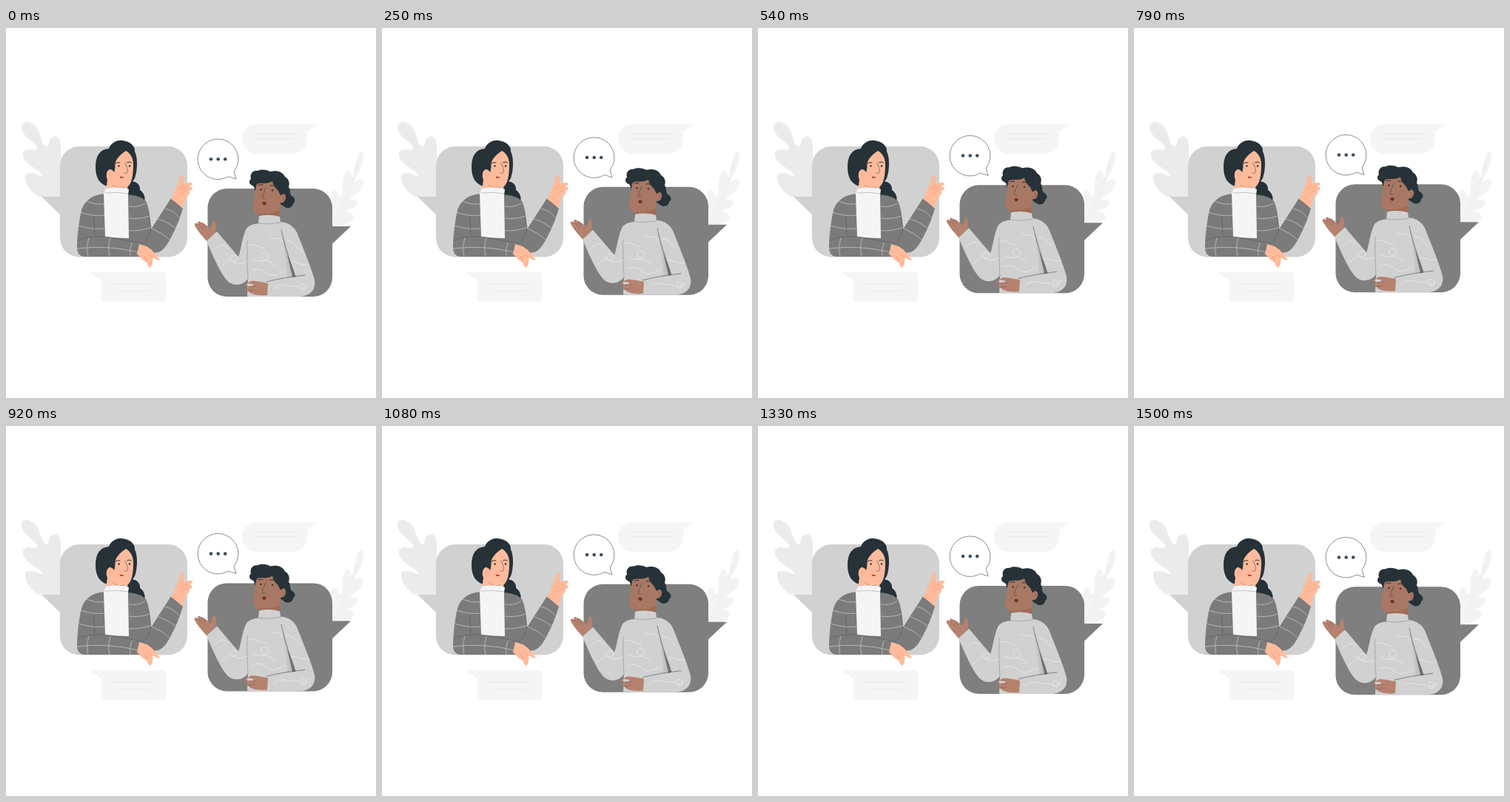
An HTML page that plays this animation: 500x500 px, repeating every 1.54 s.

```html
<!DOCTYPE html>
<html lang="en">
<head>
<meta charset="utf-8">
<title>Conversation</title>
<style>
html, body { margin: 0; width: 100%; height: 100%; overflow: hidden; background: #fff; }
svg { display: block; width: 100vw; height: 100vh; }
.leafA { fill: #ebebeb; }
.leafB { fill: #f3f3f3; }
.note { fill: #f5f5f5; }
.rule { fill: none; stroke: #e6e6e6; stroke-width: .8; }
.vein { fill: none; stroke: #e2e2e2; stroke-width: .4; }
.hair { fill: #263238; }
.skinA { fill: #ffbb9b; }
.skinB { fill: #b5826f; }
.faceB { fill: #a97864; }
.coat { fill: #7b7b7b; }
.knit { fill: #d1d1d1; }
.line { fill: none; stroke: #263238; stroke-width: .5; stroke-linecap: round; stroke-linejoin: round; }
.soft { stroke-opacity: .5; }
.brow { fill: none; stroke: #263238; stroke-width: 1; stroke-linecap: round; }
.foldA { fill: none; stroke: #e98a6c; stroke-width: .5; stroke-linecap: round; }
.foldB { fill: none; stroke: #7d5144; stroke-width: .5; stroke-linecap: round; }
.stripe { fill: none; stroke: #cfcfcf; stroke-width: .7; }
.curl { fill: none; stroke: #ededed; stroke-width: .8; stroke-linecap: round; }
</style>
</head>
<body>
<svg viewBox="0 0 500 500">
  <!-- leaves -->
  <path class="leafA" d="M21 135C19 126 31 124 39 132C47 140 46 151 51 158C54 162 57 160 58 155C59 147 67 144 71 149C74 153 74 160 74 165V228H46C38 225 31 219 27 208C24 200 26 196 33 196C40 195 46 201 49 200C47 191 30 188 24 176C21 169 24 164 30 164C36 164 43 167 42 161C37 152 23 148 21 135Z"/>
  <path class="vein" d="M30 137C45 156 62 190 73 222M64 152C67 164 65 177 62 188M30 171C44 175 54 181 61 187M33 203C46 206 60 210 69 213"/>
  <path class="leafB" d="M440 268V222C443 217 448 218 449 224C451 231 455 226 455 219C454 205 458 191 463 193C467 195 466 202 468 204C471 190 473 170 479 167C485 167 483 178 482 182C479 193 474 200 470 208C473 207 480 202 483 208C484 216 473 224 464 231C468 233 474 230 475 236C474 243 464 246 459 248C464 248 470 251 470 256C468 262 455 268 440 268Z"/>
  <path class="vein" d="M479 172C473 196 459 232 442 264M471 237Q460 239 453 243"/>

  <!-- side notes -->
  <path class="note" d="M339 130H422L407 140V150A20 20 0 0 1 387 170H339A20 20 0 0 1 339 130Z"/>
  <path class="rule" d="M334 143.5H392M337 149.5H390"/>
  <path class="note" d="M112 330H212Q216.500 330 216.500 334V366Q216.500 370 212 370H133Q128.500 370 128.500 366V341Z"/>
  <path class="rule" d="M145 346.500H202M152 355.500H193"/>

  <!-- woman -->
  <path fill="#d1d1d1" d="M48 228H74V253Z"/>
  <rect x="73" y="160" width="172" height="149.500" rx="26" fill="#d1d1d1"/>
  <path class="hair" d="M164 208C176 205 182 212 181 219C186 222 189 229 187 235C181 241 171 239 165 231Z"/>
  <path class="hair" d="M139 163C142 155 150 151 157 152C168 153 175 160 174 167C178 174 178 192 174 203L168 212L138 214C128 212 121 204 121 188C121 172 127 164 139 163Z"/>
  <path class="skinA" d="M148 181C151 174 157 169 162 166C168 169 172 176 172 184C172 196 171 207 166 213C163 216 160 216 158 216L166 219H135L137 205C135 201 135 193 140 191C143 191 145 193 146 195C148 191 147 186 148 181Z"/>
  <path class="line" d="M161 182Q165 191 164.500 195Q163 197 160 196"/>
  <path class="line soft" d="M144 212Q151 218 160 215"/>
  <path class="brow" d="M148 183Q151 180.500 154 182M164 181.500Q167 180 169.500 182"/>
  <circle cx="152.500" cy="186.500" r="1.200" fill="#263238"/>
  <circle cx="167" cy="186.500" r="1.200" fill="#263238"/>
  <path d="M153.500 200Q156 202 160 201Q157 204 154.500 202.500Z" fill="#a53a2c"/>
  <path class="foldA" d="M139 195Q142 198 141 203"/>

  <path class="coat" d="M134 224C117 225 107 232 102 246C98 264 96 283 96 296Q96 309 107 309H180L186 295C191 303 198 305 206 303C213 300 217 294 221 287C229 272 235 258 239 244L223 230L196 272C195 257 193 241 189 234C184 228 174 226 165 225Z"/>
  <path d="M135 217C144 215 157 215 166 218L165 226L166 284Q150 284 134 282L132 224Z" fill="#f5f5f5"/>
  <path class="line soft" d="M134 223Q150 221 166 224"/>
  <path d="M140 231L142 233M153 229L155 231M146 242L148 241M160 244L162 246M139 253L141 255M152 257L154 256M145 270L147 272M160 268L162 267" stroke="#e2e2e2" stroke-width=".6"/>
  <path class="stripe" d="M108 234Q120 239 133 238M101 249Q117 255 133 253M98 267Q116 273 133 271M166 241Q178 243 188 237M166 257Q181 259 194 254M166 274Q180 275 195 270M112 284Q108 296 111 309M141 284Q137 296 140 309M170 290Q166 300 168 309M96 298Q137 293 179 303M197 271Q210 276 221 286M206 258Q218 262 229 270M215 244Q226 247 234 256"/>
  <path class="line soft" d="M119 255L120 281M97 287Q108 281 134 282L186 291M196 272Q193 282 188 289M196 272Q195 260 192 249"/>
  <path class="skinA" d="M180 292L190 295C197 299 203 306 208 313C206 315 202 312 198 310C199 315 198 321 195 324C193 324 191 320 190 316C185 315 182 311 180 308L177 306Z"/>
  <path class="foldA" d="M198 310Q194 306 191 305M190 316Q188 311 187 308"/>
  <path class="skinA" d="M223 231C227 223 230 215 233 209C234 203 236 198 238.500 198C241 200 240 206 240 211C244 209 250 208 252 210C252 213 249 213 247 214C251 214 253 217 251 219L247 220C250 223 247 226 243 228L239 243Z"/>
  <path class="foldA" d="M240 211Q236 215 232 219M247 214Q241 214 237 219M247 220Q241 219 236 224"/>

  <!-- man and speech balloon -->
  <g id="float">
    <path fill="#7f7f7f" d="M440 268H466L440 292.500Z"/>
    <rect x="272.500" y="217" width="168.500" height="146" rx="26" fill="#7f7f7f"/>
    <path d="M286.500 150A27.300 27.300 0 1 0 300.500 200.700L311 204L308 194.300A27.300 27.300 0 0 0 286.500 150Z" fill="#fff" stroke="#263238" stroke-width=".55"/>
    <g fill="#3f4f5c">
      <circle cx="277" cy="177.200" r="2.300"/><circle cx="286.700" cy="177.200" r="2.300"/><circle cx="296.200" cy="177.200" r="2.300"/>
    </g>

    <path class="hair" d="M337 220C335 217 336 214 333 213C328 211 328 206 331 204C329 197 334 192 340 193C346 190 353 192 357 194C366 192 374 194 377 201C382 204 384 209 382 215C385 219 383 224 386 227C391 229 392 235 388 237C388 242 381 245 377 242L368 236Z"/>
    <path class="faceB" d="M339 211C345 208 352 212 360 207C361 213 365 217 368 220C370 224 370 226 372 226C375 222 379 225 378 230C377 235 374 237 371 236L370 255H342V252C333 249 333 242 335 234C337 227 336 218 339 211Z"/>
    <path d="M347 251Q360 251 370 246V255H342V251Z" fill="#a06b57"/>
    <path class="line" d="M351 216Q348 223 346 229Q347 231 350 230.500"/>
    <path class="brow" d="M341 212.500Q344 210.500 347 212M357 213Q360 211.500 364 214"/>
    <circle cx="344.500" cy="218.500" r="1.200" fill="#263238"/>
    <circle cx="360" cy="219.500" r="1.200" fill="#263238"/>
    <path d="M346 236Q349 233.500 352 236Q351 239.500 348.500 239.500Q346.500 238.500 346 236Z" fill="#7b3029"/>
    <path class="foldB" d="M375 227Q377 229 374 233"/>

    <path class="skinB" d="M272 289C267 283 260 276 255 267C254 263 257 263 260 265C258 261 260 260 264 263C268 263 271 267 276 271C279 268 278 262 281 260C285 264 284 271 283 277Z"/>
    <path class="foldB" d="M260 265L267 272M264 263L270 270"/>
    <path class="knit" d="M342 254Q356 251 370 255L371 262C383 263 391 269 395 281C402 299 412 322 417 341C419 354 411 362 397 363H326L327 339C320 348 309 349 302 344C292 337 280 309 271 288L285 275L314 309C318 298 319 282 325 271C329 266 335 265 341 264Z"/>
    <path d="M374 278C378 295 386 313 391 336L380 338C381 317 375 298 374 278Z" fill="#c3c3c3"/>
    <path d="M380 306C384 316 388 325 391 336L387 337Z" fill="#777"/>
    <path class="line" d="M372 273Q377 299 391 336M352 343Q375 337 404 334"/>
    <path class="line soft" d="M341 264Q355 266 371 263M326 288Q325 315 327 340"/>
    <path class="curl" d="M282 300Q293 288 300 298M291 322C303 316 305 304 311 308C317 313 306 320 302 312Q311 322 325 316M327 293C337 290 342 299 350 297M333 312C341 317 355 316 355 307C353 301 344 302 345 309C347 316 357 314 364 322M356 282C363 287 370 281 374 289M333 327Q344 323 352 331T376 328M379 288C389 286 390 296 398 300M386 316C393 314 396 322 409 319M362 352C371 342 381 351 388 349C396 347 398 355 404 354C408 350 404 343 399 346C396 351 402 356 410 346"/>
    <path class="skinB" d="M354 345C346 344 339 341 331 342C328 343 326 345 322 348C320 350 325 351 329 349C325 352 324 354 327 355C331 361 343 362 353 361Z"/>
    <path class="knit" d="M326 345L333 346L335 348Q329 349 326 349Z"/>
    <path class="foldB" d="M322 349Q330 350 337 349M327 355Q332 355 336 354"/>
  </g>
</svg>
<script>
const LOOP = 1540, RISE = 6.6, LEAD = 40, REST = 0.34;
const floater = document.getElementById("float");

// linear rise for half the loop, then linear fall
function draw(ms) {
  const p = ((ms + LEAD) % LOOP) / LOOP;
  const lift = RISE * (1 - Math.abs(2 * p - 1));
  floater.setAttribute("transform", `translate(0 ${(REST - lift).toFixed(3)})`);
}

const start = performance.now();
function tick() {
  draw(performance.now() - start);
  requestAnimationFrame(tick);
}
tick();
</script>
</body>
</html>
```
